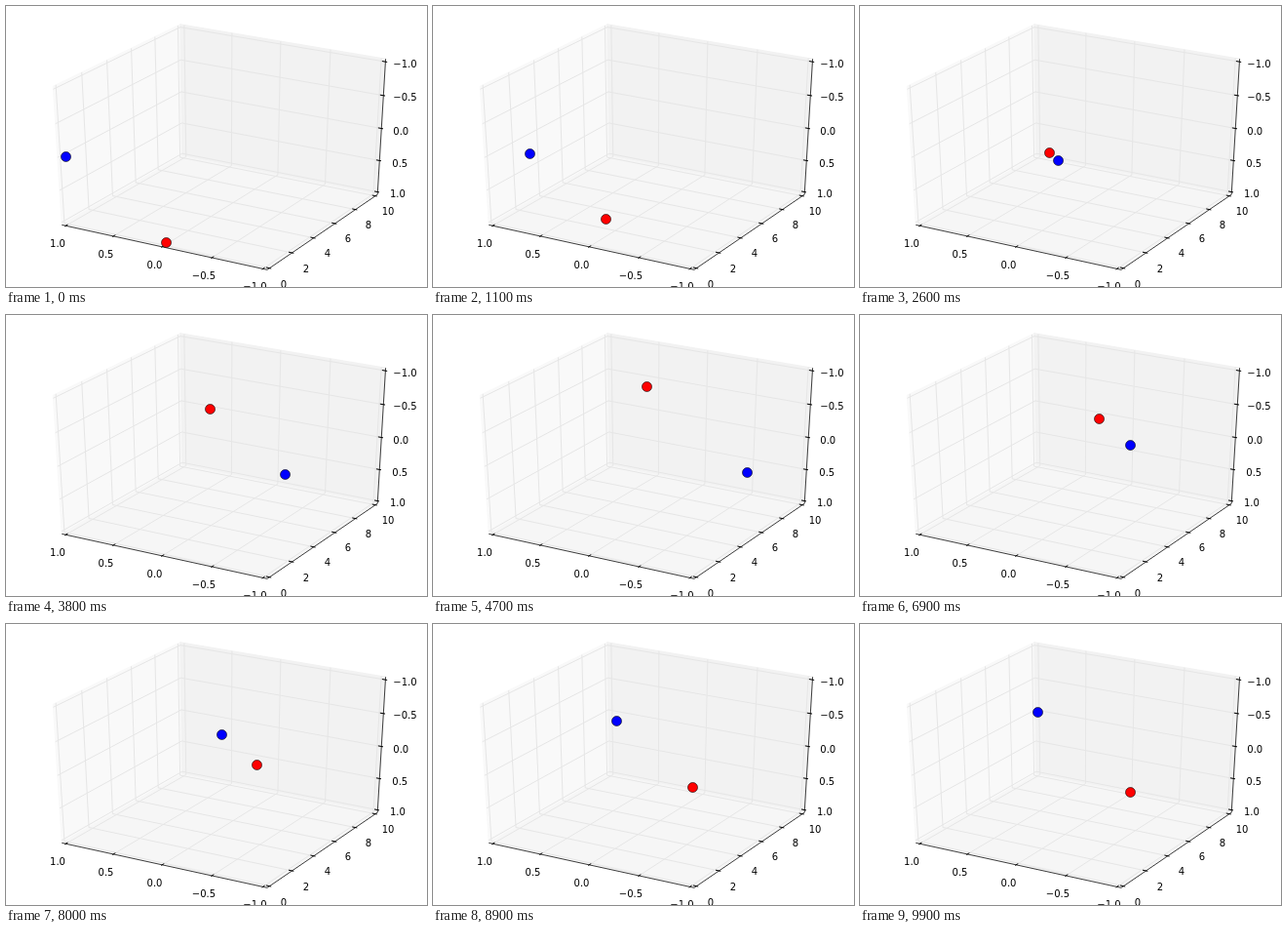
Recreate the animation shown at these times as an HTML page. Size 432 px wide and 288 px high, loop 10000 ms.

```html
<!DOCTYPE html>
<html lang="en">
<head>
<meta charset="utf-8">
<title>Two waves in a 3D box</title>
<style>
  html, body { margin: 0; width: 100%; height: 100%; overflow: hidden; background: #fff; }
  svg { display: block; }
  text { font: 10px "DejaVu Sans", sans-serif; fill: #000; }
</style>
</head>
<body>
<svg id="stage" width="432" height="288" viewBox="0 0 432 288"></svg>
<script>
const stage = document.getElementById("stage");
const EDGE = 0.5 + 1 / 48;
const STEP_MS = 100, STEPS = 100;
const PHASE = 0.06365; // radians per step

// Perspective view of a unit box centred on the origin, elevation 30, azimuth -60.
const S3 = Math.sqrt(3);
function project([x, y, z]) {
  const depth = 10 - (x * S3 / 4 - y * 0.75 + z * 0.5);
  const u = (x * S3 + y) / 2;
  const v = -x / 4 + y * S3 / 4 + z * S3 / 2;
  return [(0.095 + u / depth) * 432 / 0.185, 288 - (0.095 + v / depth) * 288 / 0.185];
}

function add(tag, attrs, text) {
  const el = document.createElementNS("http://www.w3.org/2000/svg", tag);
  for (const name in attrs) el.setAttribute(name, attrs[name]);
  if (text) el.textContent = text;
  stage.append(el);
  return el;
}

const pointList = pts => pts.map(p => project(p).map(n => n.toFixed(2)).join()).join(" ");

function pane(color, ...pts) {
  add("polygon", { points: pointList(pts), fill: color, stroke: color });
}

function line(color, width, ...pts) {
  add("polyline", { points: pointList(pts), fill: "none", stroke: color, "stroke-width": width });
}

function label(text, x, y, anchor) {
  add("text", { x, y: y + 3.6, "text-anchor": anchor }, text);
}

const L = -EDGE, H = EDGE;
const fives = [-0.5, -0.25, 0, 0.25, 0.5];
const sixes = [-0.5, -0.3, -0.1, 0.1, 0.3, 0.5];

pane("#f9f9f9", [L, L, L], [L, H, L], [L, H, H], [L, L, H]);
pane("#f2f2f2", [L, H, L], [H, H, L], [H, H, H], [L, H, H]);
pane("#f6f6f6", [L, L, L], [H, L, L], [H, H, L], [L, H, L]);

const GRID = "#e6e6e6";
for (const x of fives) line(GRID, 1, [x, L, L], [x, H, L], [x, H, H]);
for (const y of sixes) line(GRID, 1, [H, y, L], [L, y, L], [L, y, H]);
for (const z of fives) line(GRID, 1, [L, L, z], [L, H, z], [H, H, z]);

line("#000", 0.75, [L, L, L], [H, L, L]);
line("#000", 0.75, [H, L, L], [H, H, L]);
line("#000", 0.75, [H, H, L], [H, H, H]);

const OUT = 0.1 / 12, IN = 0.2 / 12;
for (const x of fives) line("#000", 1, [x, L - OUT, L], [x, L + IN, L]);
for (const y of sixes) line("#000", 1, [H + OUT, y, L], [H - IN, y, L]);
for (const z of fives) line("#000", 1, [H + OUT, H, z], [H - IN, H, z]);

const names = ["1.0", "0.5", "0.0", "\u22120.5", "\u22121.0"];
const xLabels = [[53, 243.5], [102.5, 254.3], [152.5, 265], [203, 276], [255.5, 287.3]];
const yLabels = [[285, 285.3], [308, 269.3], [330, 253.5], [351, 238.5], [372, 224], [392, 210]];
const zLabels = [[394, 192.5], [396.3, 161.5], [397.3, 128], [397.3, 93.5], [397.3, 59]];
xLabels.forEach(([x, y], i) => label(names[i], x, y, "middle"));
yLabels.forEach(([x, y], i) => label(String(i * 2), x, y, "middle"));
zLabels.forEach(([x, y], i) => label(names[i], x, y, "start"));

const dot = fill => add("circle", { r: 5, fill, stroke: "#000", "stroke-width": 0.6 });
const blue = dot("#00f"), red = dot("#f00");

// Markers sit on whole pixels.
function place(el, point) {
  const [x, y] = project(point).map(n => Math.round(n) + 0.5);
  el.setAttribute("cx", x);
  el.setAttribute("cy", y);
}

function draw() {
  const step = Math.floor(performance.now() / STEP_MS) % STEPS;
  const wave = -Math.cos(step * PHASE) / 2;
  const along = (step + 1) / STEPS - 0.5;
  place(blue, [wave, along, 0]);
  place(red, [0, along, wave]);
  requestAnimationFrame(draw);
}
draw();
</script>
</body>
</html>
```
